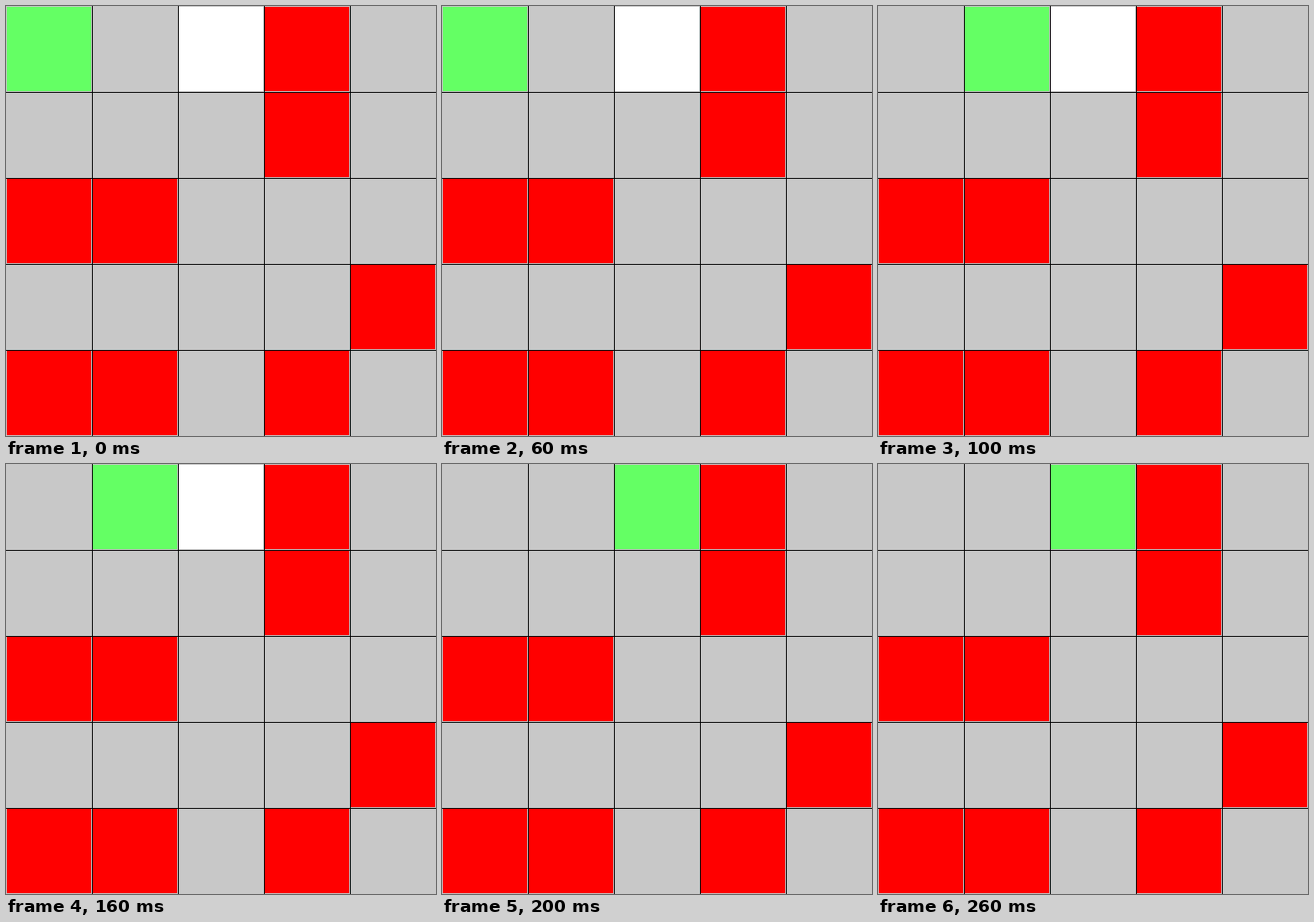
Write an HTML page with a canvas that moves like this. It is 500 by 500 pixels and loops after 300 ms.

```html
<!DOCTYPE html>
<html lang="en">
<head>
<meta charset="utf-8">
<title>Grid walk</title>
<style>
  html, body { margin: 0; width: 100%; height: 100%; overflow: hidden; background: #c8c8c8; }
  canvas { display: block; }
</style>
</head>
<body>
<canvas id="stage" width="500" height="500"></canvas>
<script>
const ctx = document.getElementById("stage").getContext("2d");
const CELL = 100, SIZE = 500, STEP_MS = 100;
const map = [
  "..G#.",
  "...#.",
  "##...",
  "....#",
  "##.#."
];
const colors = { "#": "#ff0000", G: "#ffffff" };
const path = [[0, 0], [1, 0], [2, 0]];

function fillCell(col, row, color) {
  ctx.fillStyle = color;
  ctx.fillRect(col * CELL + 1, row * CELL + 1, CELL - 2, CELL - 2);
}

function draw(step) {
  ctx.fillStyle = "#c8c8c8";
  ctx.fillRect(0, 0, SIZE, SIZE);
  ctx.fillStyle = "#000";
  for (let p = CELL; p < SIZE; p += CELL) {
    ctx.fillRect(p, 0, 1, SIZE);
    ctx.fillRect(0, p, SIZE, 1);
  }
  map.forEach((line, row) => [...line].forEach((kind, col) => {
    if (colors[kind]) fillCell(col, row, colors[kind]);
  }));
  fillCell(...path[step], "#64ff64");
}

const start = performance.now();
function tick() {
  const elapsed = performance.now() - start;
  draw(Math.floor(elapsed / STEP_MS) % path.length);
  requestAnimationFrame(tick);
}
draw(0);
requestAnimationFrame(tick);
</script>
</body>
</html>
```
